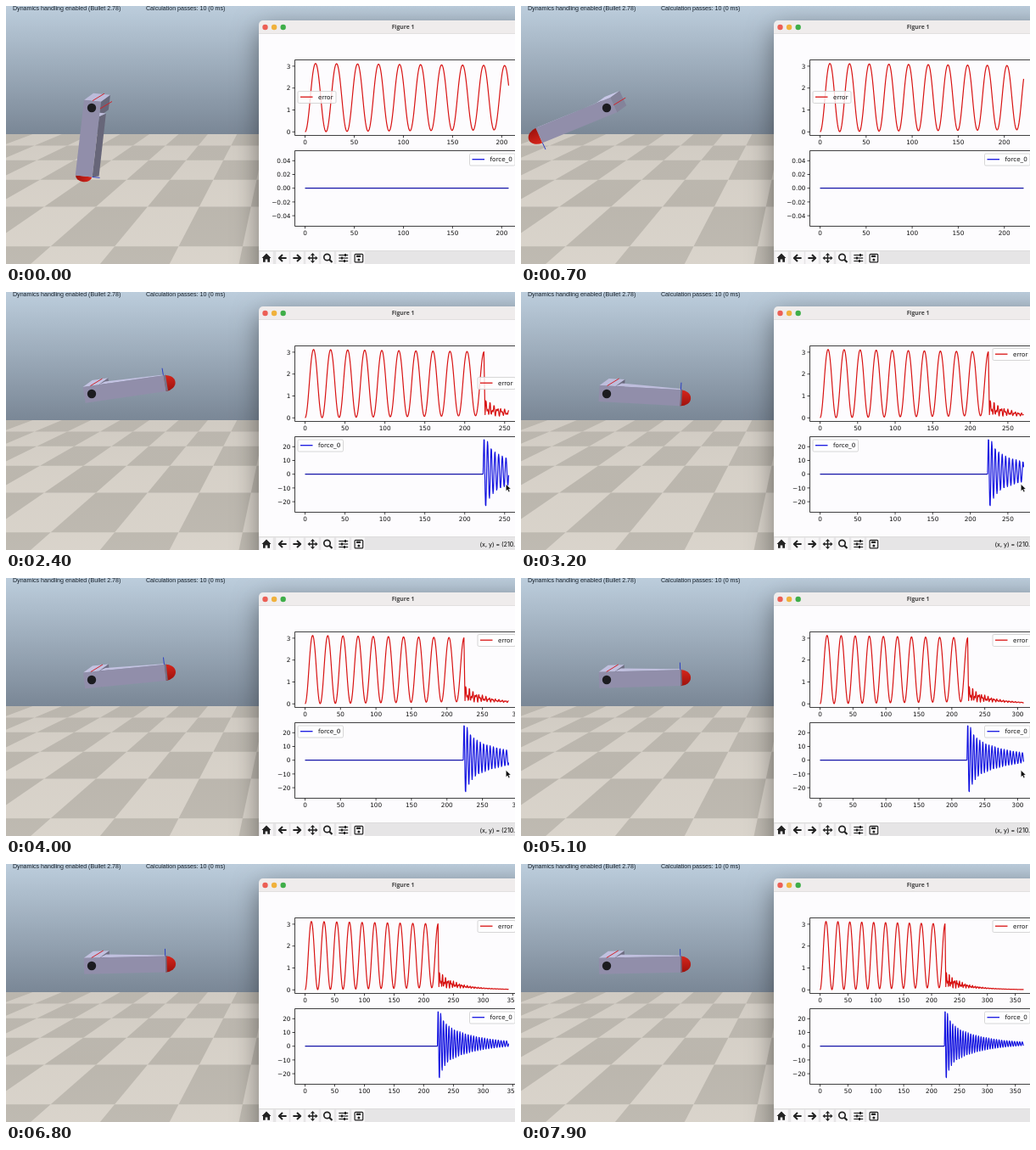
An HTML page with a canvas for the animation above (8000 ms loop, 600 by 304 pixels).

```html
<!DOCTYPE html>
<html lang="en">
<head>
<meta charset="utf-8">
<title>Pendulum control</title>
<style>
html, body { margin: 0; width: 100%; height: 100%; overflow: hidden; }
canvas { display: block; }
</style>
</head>
<body>
<canvas id="stage" width="600" height="304"></canvas>
<script>
const ctx = document.getElementById('stage').getContext('2d');
const { PI, cos, sin, exp, abs, min, max } = Math;
const TAU = 2 * PI;
const STEP = 100, STEPS = 80;
const KICK = 224;          // sample at which the controller switches on
const X0 = 352.5, SPAN = 240;
const RED = '#d81212', BLUE = '#1414e0';

// ---------- drawing helpers ----------
function poly(points, fill) {
  ctx.beginPath();
  points.forEach(([x, y]) => ctx.lineTo(x, y));
  ctx.closePath();
  ctx.fillStyle = fill;
  ctx.fill();
}

function line(points, color, width = 1) {
  ctx.beginPath();
  points.forEach(([x, y]) => ctx.lineTo(x, y));
  ctx.strokeStyle = color;
  ctx.lineWidth = width;
  ctx.stroke();
}

function rect(x, y, w, h, fill) {
  ctx.fillStyle = fill;
  ctx.fillRect(x, y, w, h);
}

function disc(x, y, r, fill) {
  ctx.beginPath();
  ctx.arc(x, y, r, 0, TAU);
  ctx.fillStyle = fill;
  ctx.fill();
}

function text(str, x, y, font, align = 'left', fill = '#111') {
  ctx.font = font;
  ctx.textAlign = align;
  ctx.textBaseline = 'alphabetic';
  ctx.fillStyle = fill;
  ctx.fillText(str, x, y);
}

const PLOT_FONT = '7.3px "DejaVu Sans", sans-serif';
const SCENE_FONT = '7.1px "Liberation Sans", Arial, sans-serif';
const TITLE_FONT = 'bold 6.8px "Open Sans", sans-serif';
const COORD_FONT = '500 7px Inter, sans-serif';

// ---------- signals, by sample number ----------
const ripple = d => cos(TAU * d / 4.62);

function swing(n) {
  const a = TAU * n / 21.36;
  const wave = cos(a) - 0.013 * (cos(3 * a) - cos(a));
  const low = 0.1 * n / KICK;
  const high = 3.13 - 0.11 * n / KICK;
  return low + (high - low) * (1 - wave) / 2;
}

function settle(d) {
  const jitter = 0.7 * ripple(d - 7.7) + 0.6 * cos(TAU * (d - 7.7) / 2.6);
  return max(0.015, 0.45 * exp(-d / 42) + 0.36 * exp(-d / 25) * jitter);
}

function error(n) {
  const d = n - KICK;
  if (d <= 0) return swing(n);
  if (d < 1.5) return 3 + (settle(1.5) - 3) * d / 1.5;
  return settle(d);
}

function force(n) {
  const d = n - KICK;
  if (d <= -1) return 0;
  if (d < 0) return 25 * (d + 1);
  const f = 1.8 + (17 * exp(-d / 55) + 14 * exp(-d / 6)) * ripple(d);
  return max(-25, min(25, f));
}

// Arm angle below the horizontal
function armAngle(n) {
  if (n < KICK) return swing(n + 1);
  if (n < KICK + 2) return 0.8;
  const d = n - KICK - 0.5;
  const amp = 0.2 * exp(-d / 70) + 0.4 * exp(-d / 4);
  return 0.01 - 0.1 * exp(-d / 60) + amp * ripple(d);
}

// ---------- 3D scene ----------
function drawScene() {
  const sky = ctx.createLinearGradient(0, 0, 0, 151);
  sky.addColorStop(0, '#bccddc');
  sky.addColorStop(1, '#7a8796');
  rect(0, 0, 600, 152, sky);
  rect(0, 151, 600, 153, '#d8d2c9');

  const vx = 330, vy = 40;
  const rowY = i => vy + 1 / (0.00901 - 0.00098 * i);
  const colX = (j, y) => vx + (j * 0.31 + 0.1) * (y - vy);
  for (let i = 0; i < 6; i++) {
    const a = rowY(i), b = rowY(i + 1);
    for (let j = -11; j < 1; j++) {
      if ((i + j) % 2) continue;
      poly([[colX(j, a), a], [colX(j + 1, a), a],
            [colX(j + 1, b), b], [colX(j, b), b]], '#b9b4ab');
    }
  }
  const haze = ctx.createLinearGradient(0, 151, 0, 304);
  haze.addColorStop(0, 'rgba(190,186,180,.3)');
  haze.addColorStop(0.5, 'rgba(205,202,196,.1)');
  haze.addColorStop(1, 'rgba(225,222,216,.15)');
  rect(0, 151, 600, 153, haze);

  text('Dynamics handling enabled (Bullet 2.78)', 8, 4.6, SCENE_FONT, 'left', '#18222c');
  text('Calculation passes: 10 (0 ms)', 165, 4.6, SCENE_FONT, 'left', '#18222c');
}

function drawArm(angle) {
  const c = cos(angle), s = sin(angle), end = 87;
  const at = (u, v) => [101 + u * c + v * s, 120 + u * s * 0.93 - v * c * 0.95];
  const shift = ([x, y], [dx, dy]) => [x + dx, y + dy];
  const blockDepth = () => [11, -8];
  const barDepth = u => [8 - 0.075 * u * (1 - abs(s)), -4 + u * 0.035];
  const visible = (nx, ny) => nx * 11 - ny * 8 > 0;

  function shade(nx, ny) {
    const t = (1 - ny) / 2 - 0.3 * nx;
    return `rgb(${88 + 104 * t},${86 + 105 * t},${104 + 118 * t})`;
  }

  function sides(u0, u1, depth) {
    const corners = [[u0, 10], [u1, 10], [u1, -10], [u0, -10]];
    const normals = [[s, -c], [c, s], [-s, c], [-c, -s]];
    normals.forEach(([nx, ny], i) => {
      if (!visible(nx, ny)) return;
      const p = corners[i], q = corners[(i + 1) % 4];
      const a = at(...p), b = at(...q);
      poly([a, b, shift(b, depth(q[0])), shift(a, depth(p[0]))], shade(nx, ny));
    });
  }

  function tip() {
    const [x, y] = at(end, 0);
    const bulge = 12 * abs(c) + 5.5 * abs(s);
    ctx.save();
    ctx.translate(x, y);
    ctx.rotate(angle);
    ctx.beginPath();
    ctx.ellipse(0, 0, bulge, 9.6, 0, -PI / 2, PI / 2);
    const g = ctx.createLinearGradient(0, -10, 0, 10);
    g.addColorStop(0, '#d8261c');
    g.addColorStop(1, '#9c120d');
    ctx.fillStyle = g;
    ctx.fill();
    ctx.restore();
  }

  tip();
  sides(-9, 10, blockDepth);
  sides(10, end, barDepth);
  poly([at(-9, 10), at(end, 10), at(end, -10), at(-9, -10)], '#918eaa');

  const mark = (u, v) => {
    const p = at(u, v);
    line([p, shift(p, [14, -8.5])], '#d0232a', 1);
  };
  if (visible(s, -c)) mark(0, 10);
  if (visible(-c, -s)) mark(-9, 0);
  line([at(end, 10), at(end, 19)], '#2b3fc4', 1);
  disc(101, 120, 5.2, '#1c1c20');
}

// ---------- plot window ----------
function drawWindow() {
  ctx.save();
  ctx.shadowColor = 'rgba(0,0,0,.42)';
  ctx.shadowBlur = 30;
  ctx.shadowOffsetY = 9;
  ctx.beginPath();
  ctx.roundRect(298, 17, 330, 320, 5);
  ctx.fillStyle = '#efecec';
  ctx.fill();
  ctx.restore();
  rect(298, 33, 302, 255.5, '#fdfcfe');
  rect(298, 32.5, 302, 0.5, '#d5d2d2');
  ['#ec5f55', '#f0b13c', '#3fae49'].forEach((col, i) => disc(305.5 + i * 10.6, 25, 3.2, col));
  text('Figure 1', 468, 27.4, TITLE_FONT, 'center', '#444');
}

function curve(fn, n, toX, toY, color, from = 0) {
  const points = [];
  for (let i = from; i < n; i += 0.5) points.push([toX(i), toY(fn(i))]);
  points.push([toX(n), toY(fn(n))]);
  ctx.lineJoin = 'round';
  line(points, color, 1.2);
}

function frame(top, bottom, n, toX, yTicks) {
  line([[604, top], [340.5, top], [340.5, bottom], [604, bottom]], '#111', 0.8);
  for (let v = 0; v <= n * 1.05; v += 50) {
    const x = toX(v);
    line([[x, bottom], [x, bottom + 2.8]], '#111', 0.8);
    text(String(v), x, bottom + 10.6, PLOT_FONT, 'center');
  }
  yTicks.forEach(([y, label]) => {
    line([[337.5, y], [340.5, y]], '#111', 0.8);
    text(label, 335.5, y + 2.7, PLOT_FONT, 'right');
  });
}

function legend(x, y, w, label, color) {
  ctx.beginPath();
  ctx.roundRect(x, y, w, 14, 1.5);
  ctx.fillStyle = 'rgba(255,255,255,.82)';
  ctx.fill();
  ctx.strokeStyle = '#ccc';
  ctx.lineWidth = 0.8;
  ctx.stroke();
  line([[x + 3, y + 6.7], [x + 17.5, y + 6.7]], color, 1.3);
  text(label, x + 24, y + 9.2, '7.2px "DejaVu Sans", sans-serif');
}

function errorPlot(k, n, toX) {
  const toY = v => 148.3 - v * 25.8;
  curve(error, n, toX, toY, RED);
  frame(63.5, 152.5, n, toX, [0, 1, 2, 3].map(v => [toY(v), String(v)]));
  if (k < 9) legend(344, 100.5, 45, 'error', RED);
  else legend(556, k < 30 ? 100.5 : 66.5, 44.5, 'error', RED);
}

function forceRange(n) {
  if (n < KICK) return [-0.05, 0.05, 0.02];
  return [n < KICK + 2 ? 0 : -25, 25, 10];
}

function tickLabel(v, step) {
  return (v < 0 ? '\u2212' : '') + abs(v).toFixed(step < 1 ? 2 : 0);
}

function forcePlot(k, n, toX) {
  const [lo, hi, step] = forceRange(n);
  const toY = v => 255.2 - (v - lo) / (hi - lo) * 81;
  const ticks = [];
  for (let i = -2; i <= 2; i++) {
    const v = i * step;
    if (v >= lo) ticks.push([toY(v), tickLabel(v, step)]);
  }
  curve(() => 0, min(n, KICK - 1), toX, toY, '#1414a8');
  if (n >= KICK) curve(force, n, toX, toY, BLUE, KICK - 1);
  frame(170.5, 259.5, n, toX, ticks);
  const left = k >= 9 && k < 43;
  legend(left ? 344 : 546.5, 174, 53.5, 'force_0', BLUE);
}

// ---------- toolbar ----------
function arrow(x, y, dir) {
  line([[x - 4.6 * dir, y], [x + 3.6 * dir, y]], '#222', 2);
  line([[x, y - 4], [x + 4.2 * dir, y], [x, y + 4]], '#222', 2);
}

function drawToolbar(showCoords) {
  rect(298, 288.5, 302, 15.5, '#e6e5e6');
  rect(298, 288, 302, 0.6, '#d4d2d2');
  const y = 297;
  [307, 326, 343, 361, 379, 397, 415].forEach(x => rect(x - 7.7, 289.5, 15.4, 14.5, '#f8f7f8'));

  poly([[301.5, y], [307, y - 5.5], [312.5, y], [311, y], [311, y + 4.7],
        [308.3, y + 4.7], [308.3, y + 1.5], [305.7, y + 1.5], [305.7, y + 4.7],
        [303, y + 4.7], [303, y]], '#222');
  arrow(326, y, -1);
  arrow(343, y, 1);

  line([[357, y], [366, y]], '#222', 1.5);
  line([[361.5, y - 4.5], [361.5, y + 4.5]], '#222', 1.5);
  for (let i = 0; i < 4; i++) {
    const c = cos(i * PI / 2), s = sin(i * PI / 2);
    const p = (a, b) => [361.5 + a * c - b * s, y + a * s + b * c];
    poly([p(6, 0), p(3.2, -2.6), p(3.2, 2.6)], '#222');
  }

  ctx.beginPath();
  ctx.arc(378.5, y - 1, 3.7, 0, TAU);
  ctx.strokeStyle = '#222';
  ctx.lineWidth = 1.7;
  ctx.stroke();
  line([[381, y + 1.5], [384.5, y + 5]], '#222', 2.2);

  [[-3.5, 2], [0, -2], [3.5, 1]].forEach(([dy, knob]) => {
    line([[392.3, y + dy], [403.2, y + dy]], '#222', 1.2);
    rect(397 + knob, y + dy - 1.5, 2, 3, '#222');
  });

  ctx.beginPath();
  ctx.roundRect(411.1, y - 4.7, 9.6, 9.6, 1);
  ctx.lineWidth = 1.2;
  ctx.stroke();
  rect(413, y - 3.4, 5, 2.4, '#222');
  disc(415.9, y + 1.9, 1.5, '#222');

  if (showCoords) text('(x, y) = (210.0, 9.4)', 558.5, 299.6, COORD_FONT, 'left', '#222');
}

function drawCursor(x, y) {
  const p = [[0, 0], [0, 8], [1.9, 6.4], [3.2, 9.2], [4.7, 8.5], [3.4, 5.8], [5.8, 5.6]]
    .map(([a, b]) => [x + a, y + b]);
  poly(p, '#0b0b0b');
  line([...p, p[0]], '#fff', 0.5);
}

// ---------- loop ----------
function draw(k) {
  const n = 207 + 2 * k;
  const toX = v => X0 + v * SPAN / n;
  const hover = k >= 10 && k < 59;
  drawScene();
  drawArm(armAngle(n));
  drawWindow();
  errorPlot(k, n, toX);
  forcePlot(k, n, toX);
  drawToolbar(hover);
  if (hover) drawCursor(589.3, 226.5);
}

function tick() {
  draw(Math.floor(performance.now() / STEP) % STEPS);
  requestAnimationFrame(tick);
}
tick();
</script>
</body>
</html>
```
